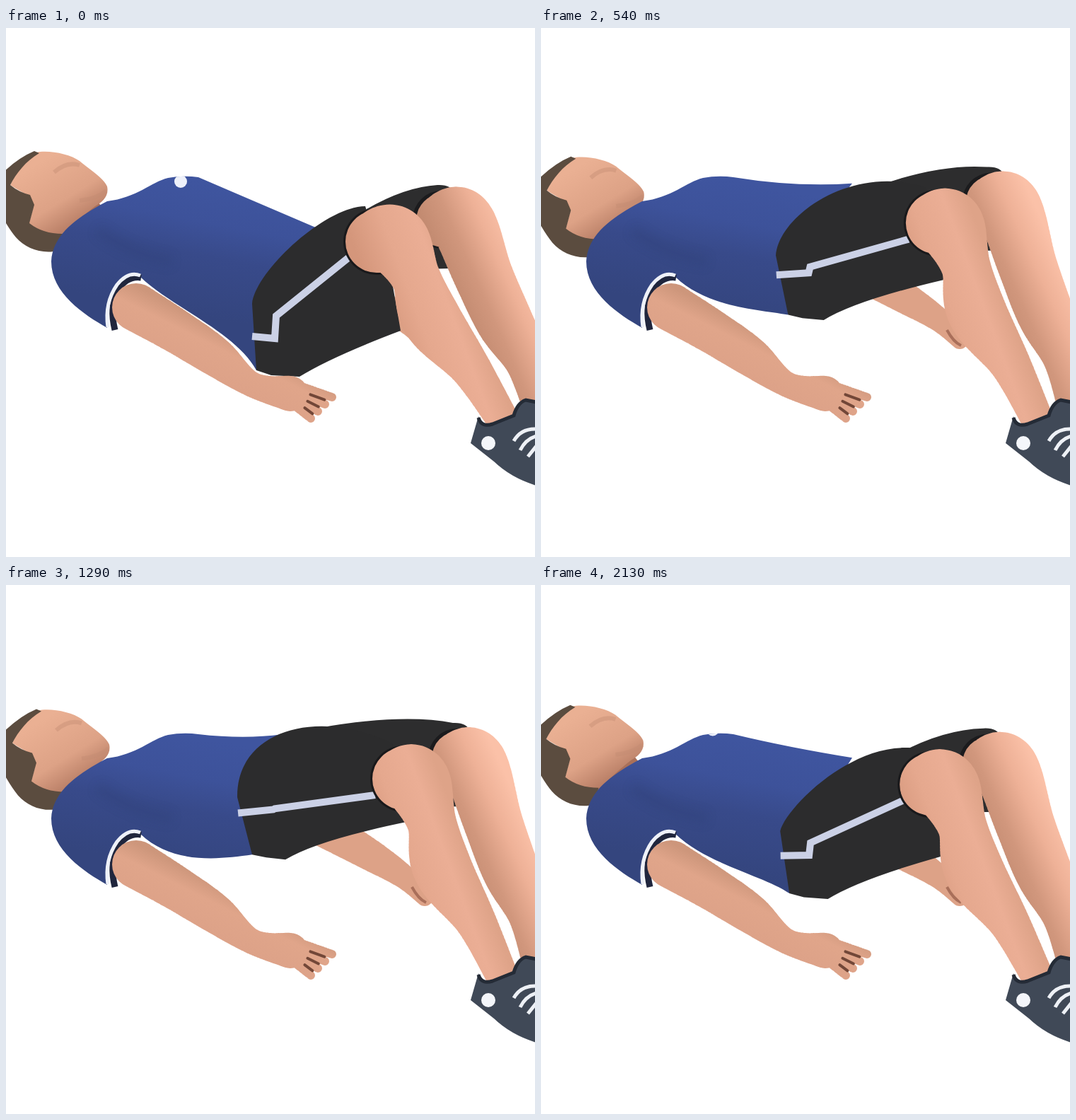
An HTML page for the animation above (2160 ms loop, 748 by 748 pixels).

```html
<!DOCTYPE html>
<html lang="en">
<head>
<meta charset="utf-8">
<title>Hip bridge</title>
<style>
  html, body { margin: 0; width: 100%; height: 100%; overflow: hidden; background: #fff; }
  svg { display: block; width: 100vw; height: 100vh; }
</style>
</head>
<body>
<svg viewBox="0 0 748 748">
  <defs>
    <linearGradient id="nearSkin" gradientUnits="userSpaceOnUse" x1="535" y1="425" x2="655" y2="380">
      <stop offset="0" stop-color="#d4967b"/><stop offset=".4" stop-color="#e5a88e"/>
      <stop offset=".75" stop-color="#ebae95"/><stop offset="1" stop-color="#dea388"/>
    </linearGradient>
    <linearGradient id="farSkin" gradientUnits="userSpaceOnUse" x1="620" y1="375" x2="732" y2="325">
      <stop offset="0" stop-color="#bd866c"/><stop offset=".4" stop-color="#d1977d"/>
      <stop offset=".72" stop-color="#eeb197"/><stop offset="1" stop-color="#fbc1a8"/>
    </linearGradient>
    <linearGradient id="armSkin" gradientUnits="userSpaceOnUse" x1="275" y1="410" x2="245" y2="470">
      <stop offset="0" stop-color="#cd967b"/><stop offset=".4" stop-color="#e0a58a"/><stop offset="1" stop-color="#dda288"/>
    </linearGradient>
    <linearGradient id="faceSkin" gradientUnits="userSpaceOnUse" x1="55" y1="185" x2="110" y2="275">
      <stop offset="0" stop-color="#eab093"/><stop offset=".6" stop-color="#dda286"/><stop offset="1" stop-color="#b67c64"/>
    </linearGradient>
    <linearGradient id="cloth" gradientUnits="userSpaceOnUse" x1="270" y1="215" x2="235" y2="400">
      <stop offset="0" stop-color="#3f559f"/><stop offset=".3" stop-color="#3d529a"/>
      <stop offset=".55" stop-color="#384a8a"/><stop offset="1" stop-color="#34457e"/>
    </linearGradient>
    <filter id="soft" x="-50%" y="-50%" width="200%" height="200%"><feGaussianBlur stdDeviation="7"/></filter>
    <clipPath id="shirtClip"><path id="shirtEdge"/></clipPath>
    <clipPath id="faceClip"><use href="#face"/></clipPath>
  </defs>

  <path id="farArm" fill="#dda287"/>
  <path d="M574 427q9 17 20 22" fill="none" stroke="#a96f5a" stroke-width="4"/>
  <path id="farShorts" fill="#2d2d2e"/>
  <circle id="farHem" r="41" fill="#1b1b1d"/>
  <path id="farLeg" fill="url(#farSkin)"/>

  <g id="head">
    <path d="M78 270L125 240L150 270L100 315L68 314Z" fill="#a97059"/>
    <path id="face" fill="url(#faceSkin)" d="M42 176C60 172 90 178 104 188C118 200 138 212 143 224C146 238 136 246 126 252C110 264 96 278 82 291C66 296 45 292 32 278L38 256L34 238Q18 230 6 222C14 204 28 186 42 176Z"/>
    <path d="M68 204Q86 188 104 194M104 244Q128 242 142 230" clip-path="url(#faceClip)" fill="none" stroke="#c08a70" stroke-width="6" opacity=".4"/>
    <path fill="#5b4c3f" d="M-8 208Q16 184 40 174L47 177C28 188 14 206 6 222Q18 232 34 236L40 250L33 276Q52 291 80 291L74 315C50 320 28 312 14 296Q4 284 -8 262Z"/>
  </g>

  <path id="shirt" fill="url(#cloth)"/>
  <g clip-path="url(#shirtClip)">
    <path d="M130 285Q170 318 235 330" fill="none" stroke="#2f3f75" stroke-width="16" opacity=".3" filter="url(#soft)"/>
    <circle id="badge" r="9" fill="#eef1fa"/>
  </g>

  <path id="shorts" fill="#2c2c2d"/>
  <path id="stripe" fill="none" stroke="#cbd1e6" stroke-width="10"/>
  <circle id="nearHem" r="47" fill="#19191b"/>
  <path id="nearLeg" fill="url(#nearSkin)"/>

  <path fill="#404957" d="M668 549Q671 563 686 560L718 547Q723 530 735 525L750 528V647Q714 636 690 613L657 587Z"/>
  <path d="M668 551Q672 565 688 560L718 548Q723 530 735 526L750 529" fill="none" stroke="#242b36" stroke-width="5"/>
  <circle cx="682" cy="587" r="10" fill="#f4f6fa"/>
  <path d="M718 584Q728 566 750 567M727 597Q735 581 750 577M738 606L750 591" fill="none" stroke="#eef1f6" stroke-width="5"/>

  <path d="M191 353Q172 350 158 370Q146 395 154 427" fill="none" stroke="#20263d" stroke-width="9"/>
  <path id="nearArm" fill="url(#armSkin)"/>
  <path id="fingerGaps" fill="none" stroke="#724738" stroke-width="4" stroke-linecap="round"/>
  <path d="M190 350Q173 343 157 363Q139 389 144 423" fill="none" stroke="#eef1f8" stroke-width="5"/>
</svg>

<script>
const $ = id => document.getElementById(id);
const setPath = (id, d) => $(id).setAttribute("d", d);
const mix = (a, b, k) => a.map((v, i) => v + (b[i] - v) * k);
const add = ([x, y], dx, dy) => [x + dx, y + dy];
const smooth = x => { x = Math.min(1, Math.max(0, x)); return x * x * (3 - 2 * x); };

const LOOP = 2160, STEP = 30, REPEATS = [1920, 930, 0];
const RISE_START = 40, PEAK = 405, FALL = 397, CYCLE = 840;

const spline = (a, b, c, d, t) => b.map((v, i) =>
  v + t / 2 * (c[i] - a[i] + t * (2 * a[i] - 5 * v + 4 * c[i] - d[i] + t * (3 * (v - c[i]) + d[i] - a[i]))));

// Soft limb: circles swept along joints given as [x, y, radius].
function limb(joints, samples = 16) {
  const at = i => joints[Math.min(joints.length - 1, Math.max(0, i))];
  let d = "";
  for (let s = 0; s <= (joints.length - 1) * samples; s++) {
    const i = Math.floor(s / samples);
    const [x, y, r] = spline(at(i - 1), at(i), at(i + 1), at(i + 2), s / samples - i);
    d += `M${x - r} ${y}a${r} ${r} 0 1 1 ${2 * r} 0a${r} ${r} 0 1 1 ${-2 * r} 0`;
  }
  return d;
}

// The planted foot stays put; the knee end takes the whole shift.
const bendLeg = (joints, dx, dy) => joints.map(([x, y, r], i) => {
  const weight = 1 - i / (joints.length - 1);
  return [x + dx * weight, y + dy * weight, r];
});

const nearLeg = [[524, 302, 44], [550, 301, 48], [579, 352, 35], [602, 412, 42], [656, 480, 29], [700, 550, 23]];
const farLeg = [[618, 272, 38], [645, 275, 46], [675, 350, 42], [705, 415, 40], [737, 470, 32], [756, 530, 27]];
const nearArm = [[184, 395, 34], [243, 430, 31], [295, 464, 28], [348, 504, 18], [402, 517, 25]];
const farArm = [[450, 345, 26], [507, 377, 23], [562, 412, 17], [592, 442, 12]];

function drawArms() {
  let hand = limb(nearArm), gaps = "";
  for (let i = 0; i < 4; i++) {
    const root = [410, 506 + 9 * i, 8], tip = [461 - 10 * i, 522 + 10 * i, 6];
    hand += limb([root, tip]);
    if (i < 3) gaps += `M${add(mix(root, tip, 0.4), 0, 6)}L${add(mix(root, tip, 0.85), -3, 6)}`;
  }
  setPath("nearArm", hand);
  setPath("fingerGaps", gaps);
  setPath("farArm", limb(farArm));
}

function place(id, [x, y]) {
  $(id).setAttribute("cx", x);
  $(id).setAttribute("cy", y);
}

function render(time) {
  const phase = time - REPEATS.find(start => time >= start);
  const lift = 1.04 * (phase < PEAK ? smooth((phase - RISE_START) / (PEAK - RISE_START)) : 1 - smooth((phase - PEAK) / FALL));
  const early = 1 - (1 - lift) ** 2, late = lift ** 2;
  const move = (x, y, x2, y2, k = lift) => mix([x, y], [x2, y2], k);

  const near = bendLeg(nearLeg, 38 * early, -28 * early);
  const far = bendLeg(farLeg, 22 * early, -27 * early);
  const thigh = near[0], farThigh = far[0];
  const hip = move(354, 484, 348, 381);

  setPath("nearLeg", limb(near));
  setPath("farLeg", limb(far));
  place("nearHem", thigh);
  place("farHem", add(farThigh, -2, -1));

  setPath("farShorts", `M${move(500, 262, 440, 202, late)}Q${move(560, 225, 560, 181)} ${add(farThigh, -8, -50)}
    Q${add(farThigh, 12, -51)} ${add(farThigh, 16, -38)}L${add(farThigh, 10, 68)}L${add(thigh, 20, 40)}Z`);

  setPath("shorts", `M${add(thigh, -16, -50)}
    C${move(450, 253, 440, 172)} ${move(352, 345, 325, 205, late)} ${move(348, 390, 327, 300)}
    L${hip}L${move(375, 491, 368, 385)}L${move(415, 493, 395, 388)}
    Q${move(460, 465, 440, 360)} ${move(558, 428, 575, 333)}L${add(thigh, 20, 46)}L${thigh}Z`);

  setPath("stripe", `M${add(thigh, -40, 23)}L${move(382, 407, 380, 316)}L${move(380, 439, 378, 317)}L${move(348, 436, 328, 322)}`);

  const shirt = `M143 245C185 240 205 218 229 212Q250 208 272 211
    Q${move(330, 236, 370, 222)} ${move(440, 283, 440, 200)}L${move(390, 400, 350, 300)}L${hip}
    C${move(325, 430, 300, 388)} 235 395 190 352C165 340 140 385 143 424
    C110 405 64 375 64 330C66 290 105 265 143 245Z`;
  setPath("shirt", shirt);
  setPath("shirtEdge", shirt);
  place("badge", move(247, 217, 238, 190));

  const sway = Math.sin(2 * Math.PI * Math.min(1, phase / CYCLE));
  $("head").setAttribute("transform", `translate(${3 * lift} ${4 * lift - 6 * sway})`);
}

drawArms();
const begin = performance.now();
function tick() {
  const time = (performance.now() - begin) % LOOP;
  render(Math.floor(time / STEP) * STEP);
  requestAnimationFrame(tick);
}
tick();
</script>
</body>
</html>
```
